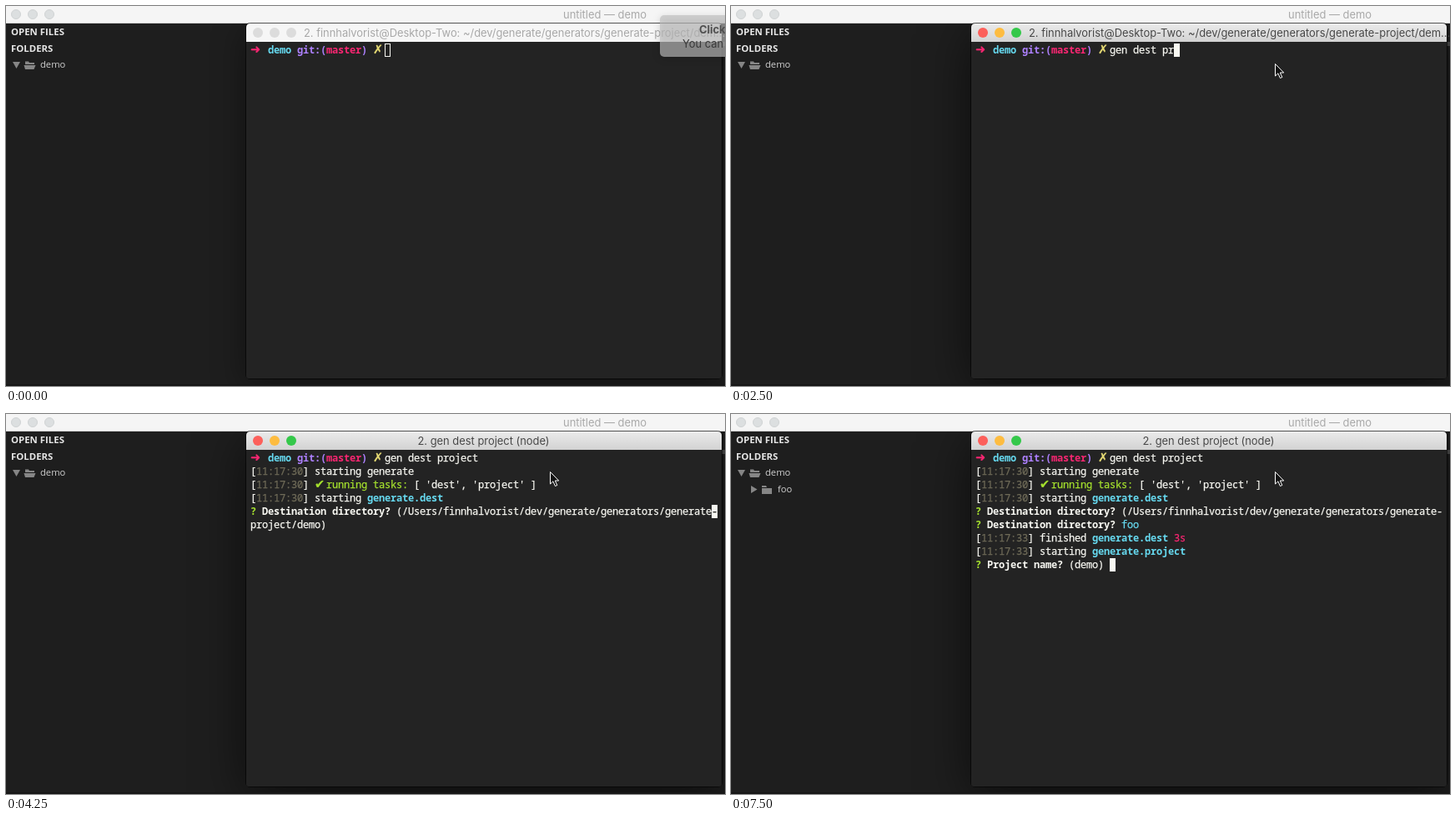
Write an HTML page that moves like this. It is 862 px wide and 456 px high and loops after 8000 ms.

```html
<!DOCTYPE html>
<html lang="en">
<head>
<meta charset="utf-8">
<title>Terminal demo</title>
<style>
  html, body { margin: 0; width: 100%; height: 100%; overflow: hidden; background: #1e1e1e; }
  svg { display: block; width: 862px; height: 456px; }
  text { white-space: pre; }
  .ui { font: 12.9px Inter, Roboto, sans-serif; }
  .side { font: 11.2px "Open Sans", "Noto Sans", sans-serif; fill: #d0d0d0; }
  .head { font-weight: 700; font-size: 11.4px; fill: #e6e6e6; }
  .icon { fill: #868686; }
  .mid { text-anchor: middle; }

  #screen { font: 12px "Noto Sans Mono", "DejaVu Sans Mono", monospace; letter-spacing: -.2px; }
  #screen tspan { fill: currentColor; stroke: currentColor; stroke-width: .25px; }
  #screen .bold { font-weight: 700; stroke: none; }
  #screen .symbol { font: 700 14.5px "DejaVu Sans", sans-serif; }
  .w { color: #f8f8f2; } .d { color: #6f6b58; } .p { color: #f92672; } .c { color: #66d9ef; }
  .v { color: #ae81ff; } .y { color: #e6db74; } .g { color: #a6e22e; } .k { color: #232323; }

  #cursor { fill: #f8f8f2; stroke: #f8f8f2; }
  #shadow { filter: drop-shadow(0 12px 30px rgba(0, 0, 0, .6)); }
  #bar { fill: url(#metal); }
  #title { fill: #484848; }
  .idle #cursor { fill: none; }
  .idle #shadow { filter: drop-shadow(0 8px 20px rgba(0, 0, 0, .45)); }
  .idle #bar { fill: #f6f6f6; }
  .idle #title { fill: #a8a8a8; }
  .idle #lights circle { fill: #dcdcdc; }
  .idle #pointer { visibility: hidden; }
</style>
</head>
<body>
<svg id="stage" class="idle" viewBox="0 0 862 456">
  <defs>
    <linearGradient id="metal" x2="0" y2="1">
      <stop stop-color="#ebebeb"/><stop offset="1" stop-color="#d2d2d2"/>
    </linearGradient>
  </defs>

  <!-- editor -->
  <rect width="862" height="456" fill="#1e1e1e"/>
  <rect id="shadow" x="288" y="21" width="570" height="426" rx="5" fill="#1e1e1e"/>
  <rect y="454" width="862" height="2" fill="#171717"/>
  <rect x="858" y="43" width="4" height="5" fill="#3c3c3c"/>
  <rect width="862" height="21" fill="#d0d0d0"/>
  <rect width="862" height="20" fill="#f5f5f5"/>
  <g fill="#dcdfe0" stroke="#d0d3d4">
    <circle cx="12" cy="10" r="5.5"/><circle cx="32" cy="10" r="5.5"/><circle cx="52" cy="10" r="5.5"/>
  </g>
  <text class="ui mid" x="718" y="15" fill="#a9a9a9">untitled — demo</text>
  <text class="side head" x="6" y="35">OPEN FILES</text>
  <text class="side head" x="6" y="55">FOLDERS</text>
  <path class="icon" d="M8 67h9l-4.5 8zM23 70v-3.500h4l1 1.500h6v2zM21.500 71h14l-2 5h-10.500z"/>
  <text class="side" x="41" y="74">demo</text>
  <g id="folder">
    <path class="icon" d="M24 86l7.500 4.500-7.500 4.500zM37 88v-2h5l1 2zM37 89h12v7h-12z"/>
    <text class="side" x="56" y="94">foo</text>
  </g>

  <!-- terminal -->
  <rect x="287.500" y="20.500" width="571" height="427" rx="5" fill="none" stroke="#000" stroke-opacity=".6"/>
  <path d="M288 43h570v401q0 3-3 3h-564q-3 0-3-3z" fill="#232323"/>
  <path id="bar" d="M288 43v-17q0-5 5-5h560q5 0 5 5v17z"/>
  <g id="lights">
    <circle cx="302" cy="32" r="6" fill="#fc605b"/>
    <circle cx="322" cy="32" r="6" fill="#fdbc40"/>
    <circle cx="342" cy="32" r="6" fill="#34c84a"/>
  </g>
  <text id="title" class="ui" y="37"></text>
  <rect id="cursor" width="6" height="15"/>
  <g id="screen"></g>

  <g id="notice">
    <rect x="784" y="11" width="100" height="50" rx="5" fill="#bcbcbc" fill-opacity=".66"
          style="filter: drop-shadow(0 2px 5px rgba(0, 0, 0, .22))"/>
    <text class="ui" x="831" y="33" font-weight="700" fill="#505050" style="font-weight: 700">Click</text>
    <text class="ui" x="811" y="50" fill="#383838">You can</text>
  </g>
  <path id="pointer" d="M652.500 69.500v14.500l3.400-3.200 2.500 5.700 2.400-1-2.500-5.500h4.400z" fill="#111" stroke="#fff"/>
</svg>

<script>
const LOOP = 8000, COL = 7, ROW = 16, LEFT = 293, TOP = 45;
const $ = id => document.getElementById(id);

// Runs are [colour, text]; a capital colour letter means bold.
const command = 'gen dest project';
const prompt = [['P', '➜'], ['C', '  demo '], ['V', 'git:('], ['P', 'master'], ['V', ') '],
  ['Y', '✗'], ['w', ' ']];
const log = (time, ...runs) => [['w', '['], ['d', '11:17:' + time], ['w', '] '], ...runs];
const ask = (label, ...runs) => [['G', '? '], ['W', label + ' '], ...runs];
const askDir = (...runs) => ask('Destination directory?', ...runs);
const path = '(/Users/finnhalvorist/dev/generate/generators/generate';
const askPath = askDir(['w', path + '-']);
const rest = 'project/demo) ';

const typed = n => [...prompt, ['w', command.slice(0, n)]];
const start = [typed(command.length), log(30, ['w', 'starting generate'])];
const tasks = [...start, log(30, ['g', '✔'], ['g', ' running tasks: '], ['w', "[ 'dest', 'project' ]"])];
const dest = [...tasks, log(30, ['w', 'starting '], ['C', 'generate.dest'])];
const answer = text => [...dest, askPath, askPath, [['w', rest + text]]];
const done = [...dest, askPath, askDir(['c', 'foo']),
  log(33, ['w', 'finished '], ['C', 'generate.dest '], ['p', '3s'])];
const project = [...done, log(33, ['w', 'starting '], ['C', 'generate.project']),
  ask('Project name?', ['w', '(demo) '])];

// Each screen: start time, rows, cursor column, cursor row
const keys = [[0, 0], [1000, 2], [1250, 3], [1500, 4], [1750, 6], [2000, 8],
  [2250, 9], [2500, 11], [2750, 14], [3000, 15], [3250, 16]];
const screens = [
  ...keys.map(([at, n]) => [at, [typed(n)], 23 + n, 0]),
  [3750, start, 0, 2],
  [4000, tasks, 0, 3],
  [4250, [...dest, askDir(['w', path], ['k', '-']), [['w', rest]]], 79, 4],
  [6000, answer('fo'), 16, 6],
  [6250, answer('foo'), 17, 6],
  [6750, done, 0, 7],
  [7000, project, 23, 8]
];

function rowMarkup(runs, row) {
  let col = 0;
  const spans = runs.map(([tone, text]) => {
    const low = tone.toLowerCase();
    const style = /[➜✗✔]/.test(text) ? ' symbol' : tone === low ? '' : ' bold';
    const x = LEFT + col * COL;
    col += text.length;
    return `<tspan x="${x}" class="${low}${style}">${text}</tspan>`;
  });
  return `<text y="${TOP + 12 + row * ROW}">${spans.join('')}</text>`;
}

function showScreen([, rows, col, row]) {
  $('screen').innerHTML = rows.map(rowMarkup).join('');
  $('cursor').setAttribute('x', LEFT + col * COL + .5);
  $('cursor').setAttribute('y', TOP + row * ROW + .5);
}

function showTitle(running) {
  const title = $('title');
  title.textContent = running ? '2. gen dest project (node)'
    : '2. finnhalvorist@Desktop-Two: ~/dev/generate/generators/generate-project/dem...';
  title.setAttribute('x', running ? 572.5 : 357);
  title.classList.toggle('mid', running);
}

const toggle = (id, on) => $(id).style.visibility = on ? 'visible' : 'hidden';
const begin = performance.now();
let current;

function draw() {
  const t = (performance.now() - begin) % LOOP;
  const screen = screens.findLast(s => s[0] <= t);
  if (screen !== current) {
    current = screen;
    showScreen(screen);
    showTitle(t >= 3750);
  }
  $('stage').classList.toggle('idle', t < 500);
  toggle('notice', t < 250);
  toggle('folder', t >= 7500);
  requestAnimationFrame(draw);
}
draw();
</script>
</body>
</html>
```
